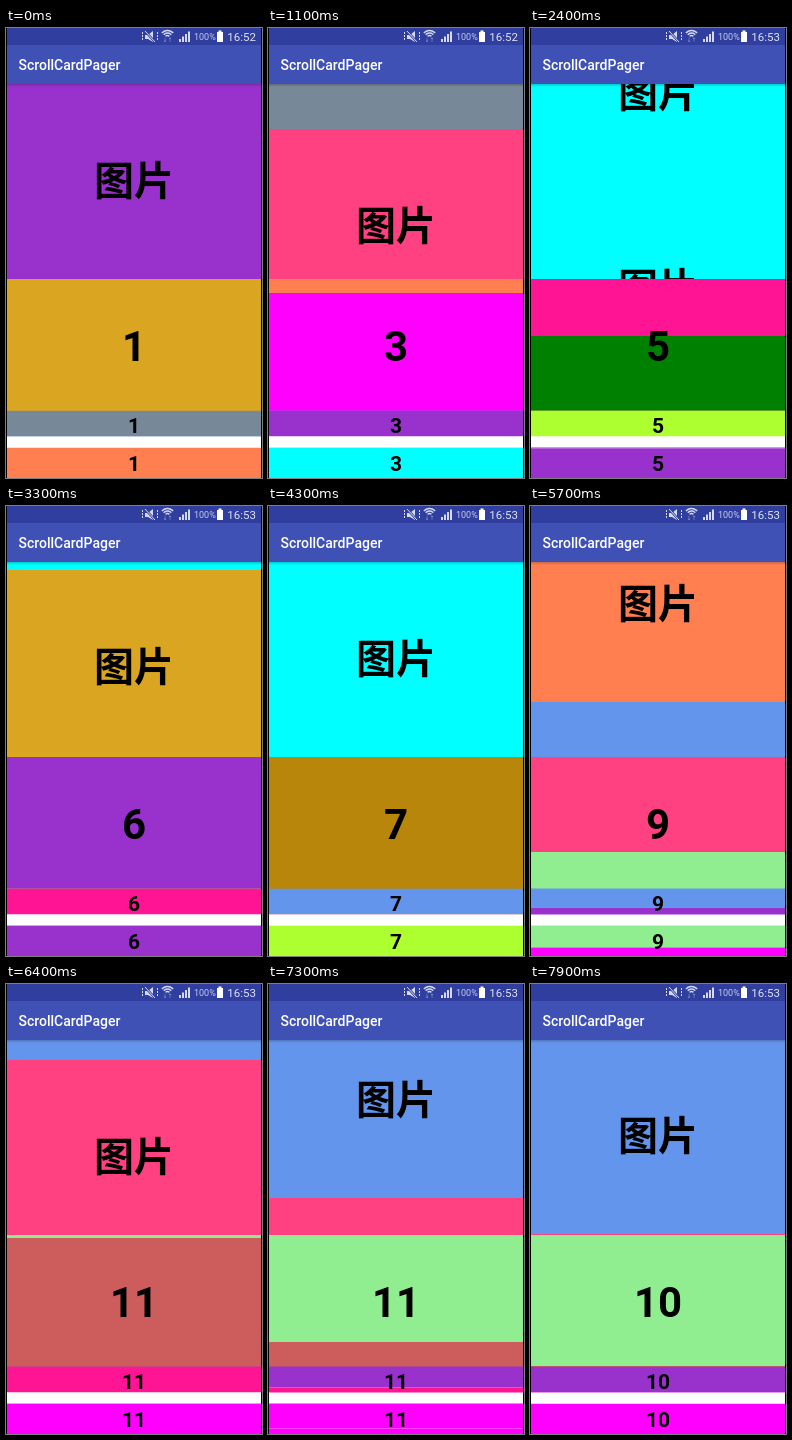
Write an HTML page with a canvas that moves like this. It is 256 px wide and 450 px high and loops after 8000 ms.

```html
<!DOCTYPE html>
<html lang="en">
<head>
<meta charset="utf-8">
<title>ScrollCardPager</title>
<style>
  html, body { margin: 0; width: 100%; height: 100%; overflow: hidden; background: #000; }
  canvas { display: block; width: 256px; height: 450px; }
</style>
</head>
<body>
<canvas id="stage" width="256" height="450"></canvas>
<script>
const ctx = document.getElementById('stage').getContext('2d');
const LOOP = 8000, STEP = 100, LEFT = 1, WIDTH = 254;

const purple = '#9932cc', gold = '#daa520', slate = '#778899', coral = '#ff7f50',
  pink = '#ff4081', magenta = '#ff00ff', cyan = '#00ffff', deepPink = '#ff1493',
  green = '#008000', lime = '#adff2f', brown = '#b8860b', blue = '#6495ed',
  mint = '#90ee90', red = '#cd5c5c';

// Card colours from top to bottom, one row per page.
const pages = [
  [purple, gold, slate, coral],
  [slate, coral, blue, mint],
  [pink, magenta, purple, cyan],
  [cyan, deepPink, coral, purple],
  [cyan, green, lime, purple],
  [gold, purple, deepPink, purple],
  [cyan, brown, blue, lime],
  [mint, cyan, coral, slate],
  [coral, pink, blue, mint],
  [blue, mint, purple, magenta],
  [pink, red, deepPink, magenta]
];

const cards = [
  { y: 56, h: 195 },
  { y: 251, h: 132, size: 42, textY: 318.5 },
  { y: 382.5, h: 26, size: 21, textY: 397.5 },
  { y: 419.5, h: 31, size: 21, textY: 435.7 }
];

// A finger drags every card by the same fraction, then each settles on its own.
const swipe = (from, to, start, drag, release, settle, even = false) =>
  ({ from, to, start, drag, release, settle, even });
const swipes = [
  swipe(1, 2, 250, .2, 400, 400),
  swipe(2, 3, 780, .13, 960, 600),
  swipe(3, 4, 1500, .15, 1650, 500),
  swipe(4, 5, 2150, .14, 2348, 600),
  swipe(5, 6, 3000, .2, 3120, 400),
  swipe(6, 7, 3720, .2, 3840, 500),
  swipe(7, 8, 4300, .15, 4450, 550),
  swipe(8, 9, 4950, .15, 5080, 550),
  swipe(9, 10, 5550, .285, 5701, 300),
  swipe(10, 11, 6020, .2, 6196, 600),
  swipe(11, 10, 6700, .88, 7350, 1300, true)
];

function progress(s, card, t) {
  if (t < s.release) return s.drag * Math.max(0, t - s.start) / (s.release - s.start);
  // Fling time grows with the card height.
  const time = s.even ? s.settle : s.settle * card.h / cards[0].h;
  const left = Math.max(0, 1 - (t - s.release) / time);
  return 1 - (1 - s.drag) * left ** 5;
}

function rect(x, y, w, h, color) {
  ctx.fillStyle = color;
  ctx.fillRect(x, y, w, h);
}

function text(str, x, y, font, color = '#000', align = 'center') {
  ctx.font = font;
  ctx.fillStyle = color;
  ctx.textAlign = align;
  ctx.fillText(str, x, y);
}

function drawCard(card, index, s, t) {
  const p = progress(s, card, t), dir = Math.sign(s.to - s.from);
  ctx.save();
  ctx.beginPath();
  ctx.rect(LEFT, card.y, WIDTH, card.h);
  ctx.clip();
  [[s.from, -p * dir], [s.to, (1 - p) * dir]].forEach(([page, offset]) => {
    const y = card.y + Math.round(offset * card.h);
    rect(LEFT, y, WIDTH, card.h, pages[page - 1][index]);
    if (index === 0) text('图片', 128, y + 111, 'bold 40px "Noto Sans CJK SC", "Noto Sans CJK", sans-serif');
  });
  ctx.restore();
  if (card.size) {
    const label = t < s.release ? s.from : s.to;
    text(label, 128, card.textY + card.size * .356, `bold ${card.size}px Roboto, sans-serif`);
  }
}

function stroke(draw, color, width = 1) {
  ctx.beginPath();
  draw();
  ctx.strokeStyle = color;
  ctx.lineWidth = width;
  ctx.stroke();
}

function drawStatusIcons() {
  const ink = '#d5d9ef';
  // Muted speaker
  ctx.fillStyle = ink;
  ctx.beginPath();
  [[139, 7], [142, 7], [147, 3], [147, 14], [142, 11], [139, 11]].forEach(p => ctx.lineTo(...p));
  ctx.fill();
  stroke(() => { ctx.moveTo(139, 3); ctx.lineTo(149, 14); }, '#303f9f', 2.5);
  stroke(() => { ctx.moveTo(139, 3); ctx.lineTo(149, 14); }, ink);
  ctx.setLineDash([2, 1]);
  [136.5, 151.5].forEach(x => stroke(() => { ctx.moveTo(x, 4); ctx.lineTo(x, 13); }, ink));
  ctx.setLineDash([]);
  // Wireless
  [2.5, 5, 7.5].forEach(r =>
    stroke(() => ctx.arc(161.5, 10, r, -Math.PI * .77, -Math.PI * .23), ink, 1.4));
  text('↓↑', 161.5, 14, '6px "DejaVu Sans", sans-serif', '#97a1d2');
  // Signal
  for (let i = 0; i < 4; i++) rect(173 + i * 3, 11 - i * 2.5, 2, 3 + i * 2.5, ink);
  // Battery
  rect(211, 4, 6, 10, '#fff');
  rect(212.5, 2.5, 3, 2, '#fff');
}

function drawBars(t) {
  rect(LEFT, 0, WIDTH, 17, '#303f9f');
  rect(LEFT, 17, WIDTH, 39, '#3f51b5');
  const shadow = ctx.createLinearGradient(0, 56, 0, 59);
  shadow.addColorStop(0, 'rgba(0,0,0,.2)');
  shadow.addColorStop(1, 'rgba(0,0,0,0)');
  rect(LEFT, 56, WIDTH, 3, shadow);
  text('ScrollCardPager', 12.5, 42, '500 14px Roboto, sans-serif', '#fff', 'left');
  drawStatusIcons();
  text('100%', 188, 12, '9px Roboto, sans-serif', '#c5cae9', 'left');
  text(t < 1600 ? '16:52' : '16:53', 250, 13, '11.5px Roboto, sans-serif', '#dfe2f3', 'right');
}

function render(now) {
  const t = Math.floor(now % LOOP / STEP) * STEP;
  const current = swipes.filter(s => s.start <= t).pop() || swipes[0];
  rect(0, 0, 256, 450, '#000');
  rect(LEFT, 56, WIDTH, 394, '#fff');
  cards.forEach((card, i) => drawCard(card, i, current, t));
  drawBars(t);
}

const began = performance.now();
function tick() {
  render(performance.now() - began);
  requestAnimationFrame(tick);
}
tick();
</script>
</body>
</html>
```
